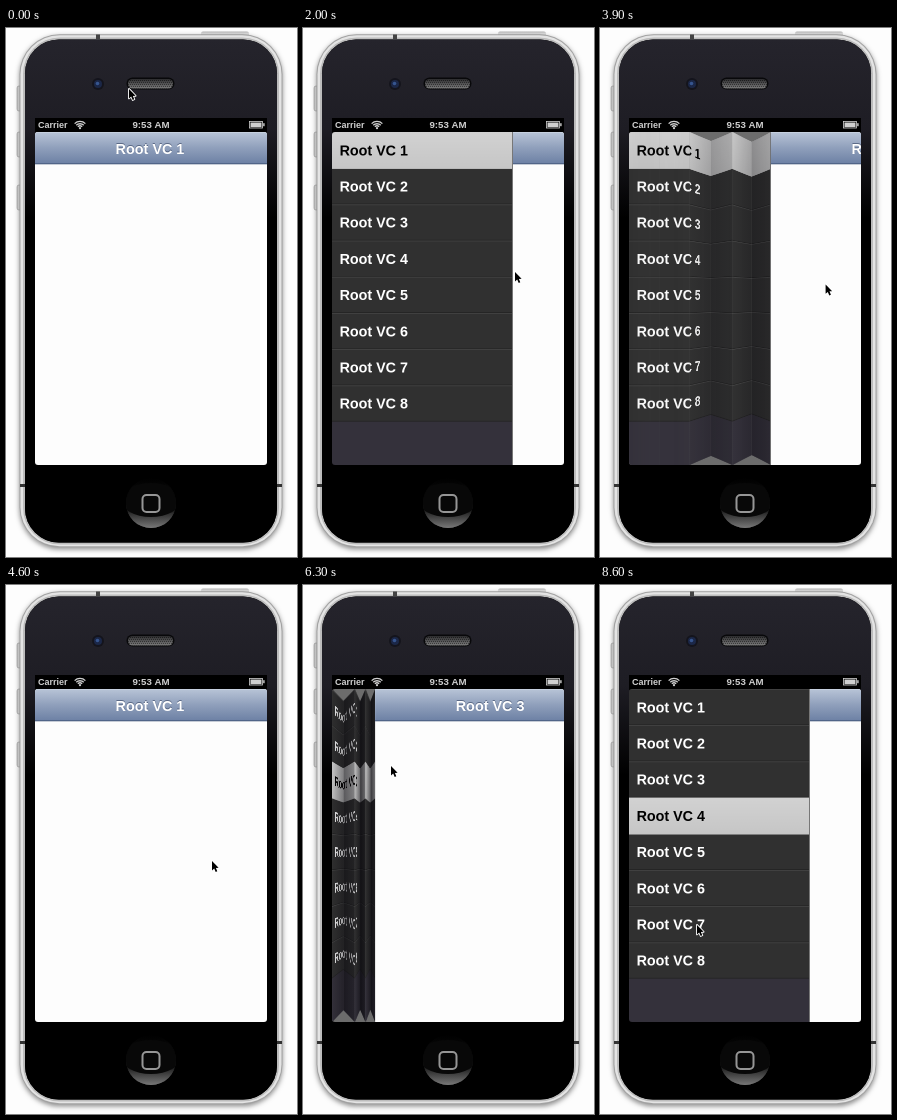
Animation of 291 by 529 pixels, one loop 8.8 s. Source, as an HTML page with a canvas:

```html
<!DOCTYPE html>
<html lang="en">
<head>
<meta charset="utf-8">
<title>Folding drawer</title>
<style>
html, body { margin: 0; width: 100%; height: 100%; overflow: hidden; background: #fdfdfd; }
canvas { display: block; width: 291px; height: 529px; }
</style>
</head>
<body>
<canvas id="stage"></canvas>
<script>
const W = 291, H = 529, LOOP = 8800, TICK = 100;
const LEFT = 29, TOP = 104, SCREEN_W = 232, SCREEN_H = 333;
const DRAWER = 181, FOLDS = 3, PULL = 0.9, DEPTH = 362, ROW = 36.2;
const FONT = '"Liberation Sans", Arial, sans-serif';
const dpr = Math.max(1, window.devicePixelRatio || 1);

// A gesture moves the pointer, drags the drawer to a width, or taps a row, which shuts it.
const GESTURES = [
  { at: 200, ms: 300, x: 80, y: 212 },
  { at: 800, ms: 1100, x: 211, y: 243, pull: DRAWER },
  { at: 2000, ms: 600, x: 110, y: 246, pull: 63 },
  { at: 2700, ms: 800, x: 230, y: 250, pull: DRAWER },
  { at: 3600, ms: 1000, x: 205, y: 275, pull: 0 },
  { at: 4700, ms: 900, x: 217, y: 225, pull: DRAWER },
  { at: 5700, ms: 300, x: 87, y: 180 },
  { at: 6200, ms: 200, row: 3, pull: 0 },
  { at: 6700, ms: 500, x: 197, y: 217, pull: DRAWER },
  { at: 7200, ms: 300, x: 90, y: 230 },
  { at: 7500, ms: 200, row: 4, pull: 0 },
  { at: 7800, ms: 700, x: 96, y: 339, pull: DRAWER }
];
const smooth = p => p * p * (3 - 2 * p);
const decay = p => p < 1 ? 1 - Math.exp(-2.87 * p) : 1;

function poseAt(t) {
  const pose = { x: 122, y: 60, pull: 0, row: 1 };
  for (const g of GESTURES.filter(g => g.at <= t)) {
    const p = Math.min(1, (t - g.at) / g.ms);
    const k = g.row ? decay(p) : smooth(p);
    for (const key of ['x', 'y', 'pull'])
      if (key in g) pose[key] += (g[key] - pose[key]) * k;
    pose.row = g.row || pose.row;
  }
  return pose;
}

function layer(w, h, scale) {
  const el = document.createElement('canvas');
  el.width = Math.round(w * scale);
  el.height = Math.round(h * scale);
  const c = el.getContext('2d');
  c.scale(scale, scale);
  return c;
}

function fade(c, x0, y0, x1, y1, ...colors) {
  const g = c.createLinearGradient(x0, y0, x1, y1);
  colors.forEach((color, i) => g.addColorStop(i / (colors.length - 1), color));
  return g;
}

function box(c, x, y, w, h, r, fill) {
  c.beginPath();
  c.roundRect(x, y, w, h, r);
  c.fillStyle = fill;
  c.fill();
}

function disc(c, x, y, r, fill) {
  c.beginPath();
  c.arc(x, y, r, 0, 7);
  c.fillStyle = fill;
  c.fill();
}

function bar(c, x, y, w, h, fill) {
  c.fillStyle = fill;
  c.fillRect(x, y, w, h);
}

function label(c, text, x, y, size, color, align = 'left') {
  c.font = `bold ${size}px ${FONT}`;
  c.textAlign = align;
  c.fillStyle = color;
  c.fillText(text, x, y);
}

function drawBody(c) {
  for (const y of [58, 104, 157]) {
    box(c, 11, y, 5, 25, 2, fade(c, 10, 0, 16, 0, '#b5b5b5', '#f0f0f0', '#999'));
    c.strokeStyle = '#a0a0a0';
    c.lineWidth = 0.6;
    c.stroke();
  }
  box(c, 195, 3.5, 48, 6, 2, fade(c, 0, 3, 0, 9, '#aaa', '#e8e8e8', '#888'));

  c.save();
  c.shadowColor = 'rgba(0,0,0,.45)';
  c.shadowBlur = 5 * dpr;
  c.shadowOffsetY = 2 * dpr;
  box(c, 13.5, 6.3, 263, 513, 40, '#a2a2a2');
  c.restore();
  box(c, 14.5, 7.3, 261, 511, 39, '#e4e4e4');
  box(c, 17, 9.5, 256, 507, 36.5, '#bcbcbc');
  bar(c, 90, 6.5, 4, 4.5, '#444');
  bar(c, 14, 456, 6, 3, '#333');
  bar(c, 270, 456, 6, 3, '#333');
  box(c, 19, 11.5, 252, 503, 34, '#000');
  box(c, 19, 11.5, 252, 503, 34, fade(c, 0, 11, 0, 190, '#25242c', '#1e1d24', '#000'));
}

function drawHardware(c) {
  disc(c, 92, 56, 6, '#14141c');
  disc(c, 92, 56, 4, '#1b2747');
  disc(c, 91.5, 55.5, 1.8, '#36558f');

  box(c, 120.5, 49.5, 48, 12, 6, '#08080a');
  box(c, 122, 51, 45, 9.5, 4.5, fade(c, 0, 51, 0, 60, '#2c2c2e', '#777'));
  c.save();
  c.clip();
  for (let y = 52; y < 61; y += 2)
    for (let x = 122 + y % 4 / 2; x < 168; x += 2) bar(c, x, y, 1, 1, 'rgba(0,0,0,.45)');
  c.restore();

  disc(c, 145, 475, 25, fade(c, 0, 450, 0, 500, '#000', '#101010', '#4a4a4a'));
  c.save();
  c.clip();
  bar(c, 119, 485, 52, 16, fade(c, 0, 485, 0, 500, '#2c2c2c', '#777'));
  c.beginPath();
  c.ellipse(145, 472, 30, 17, 0, 0, 7);
  c.fillStyle = '#080808';
  c.fill();
  c.restore();
  c.beginPath();
  c.roundRect(136.5, 467, 17, 17, 4);
  c.strokeStyle = '#969696';
  c.lineWidth = 2;
  c.stroke();
}

function drawStatus(c) {
  const ink = '#cfcfcf';
  bar(c, LEFT, 90, SCREEN_W, 15, '#000');
  label(c, 'Carrier', 32, 100.3, 9, ink);
  label(c, '9:53 AM', 145, 100.3, 9.7, ink, 'center');
  c.strokeStyle = ink;
  c.lineWidth = 1.4;
  for (let r = 3; r < 8; r += 2.3) {
    c.beginPath();
    c.arc(74, 101, r, -Math.PI * 0.75, -Math.PI * 0.25);
    c.stroke();
  }
  disc(c, 74, 100.2, 1.1, ink);
  c.lineWidth = 0.8;
  c.strokeRect(243.5, 93.5, 13, 6.5);
  bar(c, 244.5, 94.5, 11, 4.6, ink);
  bar(c, 257.2, 95.2, 1.4, 3, ink);
}

const phone = layer(W, H, dpr);
bar(phone, 0, 0, W, H, '#fdfdfd');
drawBody(phone);
drawHardware(phone);
drawStatus(phone);

const SHARP = 2 * dpr;
function makeMenu(chosen) {
  const c = layer(DRAWER, SCREEN_H, SHARP);
  bar(c, 0, 0, DRAWER, SCREEN_H, '#34313b');
  for (let y = 0; y < 8 * ROW - 1; y += ROW) {
    bar(c, 0, y, DRAWER, ROW, '#303030');
    bar(c, 0, y, DRAWER, 0.8, '#454545');
    bar(c, 0, y + ROW - 0.8, DRAWER, 0.8, '#232323');
  }
  const top = (chosen - 1) * ROW;
  bar(c, 0, top, DRAWER, ROW + 0.7, fade(c, 0, top, 0, top + ROW, '#d2d2d2', '#c6c6c6'));
  for (let i = 1; i <= 8; i++)
    label(c, `Root VC ${i}`, 7.6, (i - 1) * ROW + 23.3, 14.3, i === chosen ? '#000' : '#fff');
  bar(c, DRAWER - 1, 0, 1, SCREEN_H, '#777');
  return c.canvas;
}
const menus = {};
const menuFor = row => menus[row] ||= makeMenu(row);

const view = document.getElementById('stage');
view.width = Math.round(W * dpr);
view.height = Math.round(H * dpr);
const ctx = view.getContext('2d');
ctx.scale(dpr, dpr);

// One half of a fold, narrowed to w and receding toward its inner edge.
function drawLeaf(menu, sx, sw, x, w, open, right) {
  const far = sw * Math.sqrt(1 - open * open);
  const mid = TOP + SCREEN_H / 2;
  const n = Math.max(1, Math.ceil(w * 2)), step = w / n;
  const tall = p => SCREEN_H * DEPTH / (DEPTH + far * (right ? 1 - p : p));
  for (let i = 0; i < n; i++) {
    const h = tall((i + 0.5) / n);
    const wide = Math.min(step + 0.4, w - i * step);
    ctx.drawImage(menu, (sx + sw * i / n) * SHARP, 0, sw * wide / w * SHARP, SCREEN_H * SHARP,
      x + i * step, mid - h / 2, wide, h);
  }
  const dim = a => `rgba(6,5,10,${a * (1 - open)})`;
  const a = tall(0) / 2, b = tall(1) / 2;
  ctx.beginPath();
  ctx.moveTo(x, mid - a);
  ctx.lineTo(x + w, mid - b);
  ctx.lineTo(x + w, mid + b);
  ctx.lineTo(x, mid + a);
  ctx.fillStyle = fade(ctx, x, 0, x + w, 0, dim(right ? 0.9 : 0.05), dim(right ? 0.55 : 0.6));
  ctx.fill();
}

function drawDrawer(menu, width) {
  if (width >= DRAWER - 0.5) {
    ctx.drawImage(menu, LEFT, TOP, DRAWER, SCREEN_H);
    return;
  }
  bar(ctx, LEFT, TOP, width, SCREEN_H, '#6c6c6c');
  const fold = DRAWER / FOLDS, half = fold / 2;
  let x = LEFT, rest = width;
  for (let i = 0; i < FOLDS; i++) {
    const reach = i < FOLDS - 1 ? fold * (1 + PULL) : fold;
    const open = Math.min(1, rest / reach), w = half * open;
    drawLeaf(menu, i * fold, half, x, w, open, false);
    drawLeaf(menu, i * fold + half, half, x + w, w, open, true);
    x += 2 * w;
    rest -= 2 * w;
  }
}

function drawPage(x, row) {
  bar(ctx, x, TOP, SCREEN_W, SCREEN_H, '#fdfdfd');
  bar(ctx, x, TOP, SCREEN_W, 32, fade(ctx, 0, TOP, 0, TOP + 32, '#b8c4d7', '#8f9fbb', '#6c80a4'));
  bar(ctx, x, TOP, SCREEN_W, 1, '#c6d0df');
  bar(ctx, x, TOP + 31.3, SCREEN_W, 1, '#465a7c');
  const title = `Root VC ${row}`, mid = x + 115;
  label(ctx, title, mid, 124.7, 14.4, 'rgba(40,55,85,.55)', 'center');
  label(ctx, title, mid, 125.5, 14.4, '#fff', 'center');
}

function drawPointer(x, y) {
  ctx.save();
  ctx.translate(x + 1, y + 1);
  ctx.beginPath();
  [[0, 0], [0, 9.4], [2.2, 7.5], [3.7, 11], [5.3, 10.3], [3.9, 6.9], [6.6, 6.8]]
    .forEach(p => ctx.lineTo(...p));
  ctx.closePath();
  ctx.lineJoin = 'round';
  ctx.lineWidth = 1.8;
  ctx.strokeStyle = '#fff';
  ctx.fillStyle = '#000';
  ctx.stroke();
  ctx.fill();
  ctx.restore();
}

function draw(now) {
  const { x, y, pull, row } = poseAt(Math.floor(now % LOOP / TICK) * TICK);
  ctx.drawImage(phone.canvas, 0, 0, W, H);
  ctx.save();
  ctx.beginPath();
  ctx.roundRect(LEFT, TOP, SCREEN_W, SCREEN_H, 3);
  ctx.clip();
  if (pull > 0) drawDrawer(menuFor(row), pull);
  drawPage(LEFT + pull, row);
  ctx.restore();
  drawPointer(x, y);
}

const start = performance.now();
function tick() {
  draw(performance.now() - start);
  requestAnimationFrame(tick);
}
tick();
</script>
</body>
</html>
```
